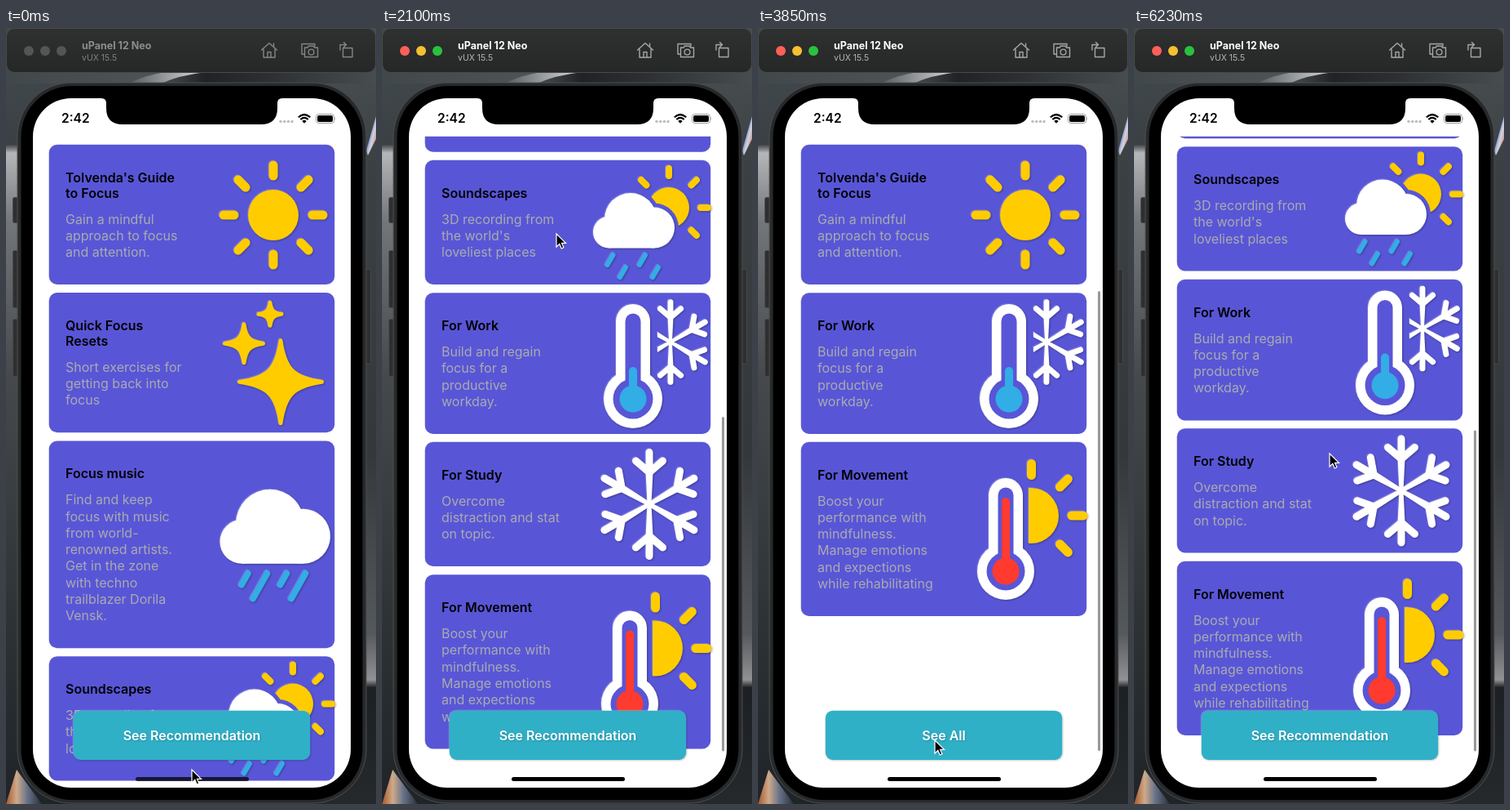
Animation, 454 px wide and 950 px high, one loop 6.3 s. Source, as an HTML page:

```html
<!DOCTYPE html>
<html lang="en">
<head>
<meta charset="utf-8">
<title>Focus list</title>
<style>
html, body { margin: 0; width: 100%; height: 100%; overflow: hidden; background: #34393c; }
svg { display: block; width: 454px; height: 950px; font-family: Inter, "Liberation Sans", sans-serif; }
.title { font-weight: 600; font-size: 16px; fill: #000; }
.body { font-size: 16px; fill: #aaaab0; }
.icon { filter: drop-shadow(1px 1px 1px rgba(0, 0, 0, .3)) drop-shadow(-.5px -.5px .5px rgba(255, 255, 255, .2)); }
.icon, .line { stroke-linecap: round; stroke-linejoin: round; }
.label { font-weight: 600; font-size: 16px; fill: #fff; text-anchor: middle; filter: drop-shadow(1px 1px 1px rgba(0, 0, 0, .2)); }
#button { filter: drop-shadow(1px 1px 1px rgba(0, 0, 0, .2)) drop-shadow(-.5px -.5px .5px rgba(255, 255, 255, .25)); }
#bar { --name: #8c8c8c; --sub: #808080; --tool: #858585; --a: #555; --b: #555; --c: #555; }
#bar.active { --name: #fff; --sub: #b4b4b4; --tool: #a6a6a6; --a: #ff5f57; --b: #f5c131; --c: #2ac13f; }
</style>
</head>
<body>
<svg viewBox="0 0 454 950">
  <defs>
    <linearGradient id="left" x2="0" y2="1">
      <stop offset="0" stop-color="#454c50"/><stop offset=".15" stop-color="#3a4044"/>
      <stop offset=".161" stop-color="#b4b6b8"/><stop offset=".25" stop-color="#737678"/>
      <stop offset=".45" stop-color="#45494c"/><stop offset=".8" stop-color="#2b3033"/><stop offset="1" stop-color="#1e2428"/>
    </linearGradient>
    <linearGradient id="right" x2="0" y2="1">
      <stop offset="0" stop-color="#4d5255"/><stop offset=".18" stop-color="#3b4043"/>
      <stop offset=".55" stop-color="#34383b"/><stop offset=".78" stop-color="#56595c"/>
      <stop offset=".84" stop-color="#909294"/><stop offset=".85" stop-color="#1d2022"/><stop offset="1" stop-color="#25292c"/>
    </linearGradient>
    <linearGradient id="top">
      <stop offset="0" stop-color="#41484c"/><stop offset=".4" stop-color="#4d5357"/>
      <stop offset=".54" stop-color="#202325"/><stop offset=".7" stop-color="#2b2f31"/><stop offset="1" stop-color="#484d50"/>
    </linearGradient>
    <linearGradient id="streak">
      <stop offset="0" stop-color="#555b5f"/><stop offset="1" stop-color="#dcddde"/>
    </linearGradient>
    <linearGradient id="prism" x2="1" y2="1">
      <stop offset="0" stop-color="#6b4fa8"/><stop offset=".35" stop-color="#4a7fe0"/>
      <stop offset=".6" stop-color="#d5d2da"/><stop offset="1" stop-color="#b8653e"/>
    </linearGradient>
    <linearGradient id="glow">
      <stop offset="0" stop-color="#a8582c"/><stop offset=".3" stop-color="#cfa98a"/>
      <stop offset=".6" stop-color="#65718a"/><stop offset="1" stop-color="#2b3033"/>
    </linearGradient>
    <linearGradient id="chrome" x2="0" y2="1">
      <stop offset="0" stop-color="#2f3030"/><stop offset="1" stop-color="#262727"/>
    </linearGradient>
    <clipPath id="screen"><rect x="33" y="86" width="390" height="844" rx="47"/></clipPath>
    <clipPath id="view"><rect x="33" y="132.700" width="390" height="798"/></clipPath>
    <clipPath id="rightHalf"><rect x="338" y="0" width="80" height="160"/></clipPath>
    <clipPath id="halfDisc"><rect x="332" y="0" width="80" height="213"/></clipPath>
  </defs>

  <rect width="227" height="950" fill="url(#left)"/>
  <rect x="227" width="227" height="950" fill="url(#right)"/>
  <rect width="454" height="68" fill="url(#top)"/>
  <path d="M150 68Q170 58 195 54H245Q212 58 190 68Z" fill="url(#streak)"/>
  <path d="M442 150L454 108V136L444 156Z" fill="url(#prism)"/>
  <path d="M0 950L13 908L44 950Z" fill="url(#glow)"/>

  <g id="bar">
    <rect x=".5" y=".5" width="453" height="54" rx="10" fill="url(#chrome)" stroke="#484a4a"/>
    <circle cx="28" cy="28" r="6" fill="var(--a)"/>
    <circle cx="48" cy="28" r="6" fill="var(--b)"/>
    <circle cx="68" cy="28" r="6" fill="var(--c)"/>
    <text x="93" y="26" font-size="12.500" font-weight="700" fill="var(--name)">uPanel 12 Neo</text>
    <text x="93" y="40" font-size="10.500" fill="var(--sub)">vUX 15.5</text>
    <g class="line" fill="none" stroke="var(--tool)" stroke-width="1.400">
      <path d="M313.500 27L323 18.500L332.500 27M316 25.500V36H330V25.500M328.500 22.500V19M321 36V29.500H325V36"/>
      <path d="M366 32H363V19.500H379V22M366.500 24H370L371.500 22H377L378.500 24H382.500V35.500H366.500Z"/>
      <circle cx="374.500" cy="29.500" r="3.400"/>
      <path d="M413.500 24.500H425V35.500H413.500ZM410 27V20.500H417M414.500 17.500L417.500 20.500L414.500 23.500"/>
    </g>
  </g>

  <g fill="#2d2f31" stroke="#45484a">
    <rect x="8.500" y="207.500" width="8" height="31" rx="2"/>
    <rect x="8.500" y="272.500" width="8" height="70" rx="2"/>
    <rect x="8.500" y="356.500" width="8" height="70" rx="2"/>
    <rect x="439.500" y="295.500" width="8" height="116" rx="2"/>
  </g>
  <rect x="14" y="67" width="428" height="882" rx="66" fill="#27292b" stroke="#4c4e50"/>
  <rect x="18.500" y="71" width="419" height="874" rx="62" fill="#000"/>

  <g clip-path="url(#screen)">
    <rect x="33" y="86" width="390" height="844" fill="#fff"/>
    <g clip-path="url(#view)"><g id="list"></g></g>
    <rect id="thumb" x="417" width="3" rx="1.500" fill="#98989a"/>
    <rect id="button" x="82.700" y="835.700" width="290.500" height="60.300" rx="9" fill="#30b0c7"/>
    <text id="some" class="label" x="228" y="872">See Recommendation</text>
    <text id="all" class="label" x="228" y="872">See All</text>
    <rect id="home" x="159" y="917" width="139" height="5" rx="2.500"/>
    <path d="M117 86q6 0 6 6v6q0 20 20 20h170q20 0 20-20v-6q0-6 6-6z"/>
    <text x="68" y="116.300" font-size="15.500" font-weight="600">2:42</text>
    <g fill="#bdbdbf">
      <circle cx="337" cy="114.500" r="1.700"/><circle cx="341.700" cy="114.500" r="1.700"/>
      <circle cx="346.400" cy="114.500" r="1.700"/><circle cx="351" cy="114.500" r="1.700"/>
    </g>
    <g fill="none" stroke="#000" stroke-width="2.200">
      <path d="M358.800 109.300Q366 102.700 373.200 109.300M361.300 112Q366 107.700 370.700 112"/>
    </g>
    <path d="M366 116.800L363.300 114Q366 111.700 368.700 114Z"/>
    <rect x="380.500" y="105.500" width="22" height="11" rx="3.200" fill="none" stroke="#999"/>
    <rect x="382" y="107" width="19" height="8" rx="2"/>
    <path d="M403.700 109.200q1.800 1.800 0 3.600z" fill="#999"/>
  </g>

  <g id="pointer">
    <g id="ring" fill="none">
      <circle r="20.300" stroke="#fff" stroke-opacity=".6"/>
      <circle r="21.500" stroke="#000" stroke-width="1.500"/>
    </g>
    <path d="M0 0V16L3.800 12.400L6.200 18L8.900 16.800L6.500 11.400H11.500Z" stroke="#fff" stroke-width="1.200"/>
  </g>
</svg>

<script>
const INDIGO = '#5856d6', YELLOW = '#ffcc00', BLUE = '#32ade6', RED = '#ff3b30';
const LOOP = 6300, STEP = 70, MAX = 604;
const $ = id => document.getElementById(id);

const line = (x1, y1, x2, y2, w, c) =>
  `<path d="M${x1} ${y1}L${x2} ${y2}" stroke="${c}" stroke-width="${w}"/>`;
const disc = (x, y, r, c) => `<circle cx="${x}" cy="${y}" r="${r}" fill="${c}"/>`;
const icon = (...parts) => `<g class="icon">${parts.join('')}</g>`;

// Rays start at the top and go clockwise in steps of 45 degrees.
const rays = (x, y, from, to, w, picks) => picks.map(i =>
  `<g transform="translate(${x} ${y}) rotate(${i * 45})">${line(0, -from, 0, -to, w, YELLOW)}</g>`).join('');

function star(x, y, r) {
  const a = .1 * r, b = .31 * r;
  return `<path transform="translate(${x} ${y})" fill="${YELLOW}" stroke="${YELLOW}" stroke-width="5"
    d="M0 ${-r}C${a} ${-b} ${b} ${-a} ${r} 0C${b} ${a} ${a} ${b} 0 ${r}C${-a} ${b} ${-b} ${a} ${-r} 0C${-b} ${-a} ${-a} ${-b} 0 ${-r}Z"/>`;
}

// Each puff is [x, y, r]; the base joins the outer two.
function cloud(puffs, grow = 0, c = '#fff') {
  const [l, , r] = puffs, bottom = l[1] + l[2];
  return puffs.map(p => disc(p[0], p[1], p[2] + grow, c)).join('') +
    `<rect x="${l[0]}" y="${l[1] - 14}" width="${r[0] - l[0]}" height="${bottom - l[1] + 14 + grow}" fill="${c}"/>`;
}

function thermometer(x, top, bulb, r, stem, c) {
  return line(x, top, x, bulb, 42, '#fff') + disc(x, bulb, r, '#fff') +
    line(x, top, x, bulb, 19, INDIGO) + disc(x, bulb, r - 11.5, INDIGO) +
    line(x, stem, x, bulb, 10, c) + disc(x, bulb, 16.5, c);
}

// Arms taper from the branching point to the centre.
function flake(x, y, s) {
  let arms = '';
  for (let i = 0; i < 6; i++)
    arms += `<g transform="rotate(${i * 60})"><path d="M0 -63.5V-40M-16.500 -53L0 -39L16.500 -53"/>
      <path d="M-4.500 -40L-2.500 0H2.500L4.500 -40Z" fill="#fff" stroke="none"/></g>`;
  return `<g transform="translate(${x} ${y}) scale(${s})" fill="none" stroke="#fff" stroke-width="9">${arms}</g>`;
}

const bigCloud = [[289.5, 123, 27], [324, 101, 42], [364.5, 116.5, 33.5]];
const smallCloud = [[278.5, 88, 19.5], [305, 72, 32], [334, 82.5, 25]];

const cards = [
  { y: 143, h: 171, to: 143, title: ["Tolvenda's Guide", 'to Focus'],
    body: ['Gain a mindful', 'approach to focus', 'and attention.'],
    art: icon(disc(328, 86, 31, YELLOW), rays(328, 86, 48, 61, 11, [0, 1, 2, 3, 4, 5, 6, 7])) },
  { y: 324.3, h: 171, title: ['Quick Focus', 'Resets'],
    body: ['Short exercises for', 'getting back into', 'focus'],
    art: icon(star(337, 109, 50.5), star(292, 62, 23.5), star(324, 26, 14)) },
  { y: 505.8, h: 253.5, title: ['Focus music'],
    body: ['Find and keep', 'focus with music', 'from world-', 'renowned artists.', 'Get in the zone', 'with techno', 'trailblazer Dorila', 'Vensk.'],
    art: icon(cloud(bigCloud),
      ...[[297, 289, 176], [320.5, 303, 193], [344.5, 336.5, 176], [367.5, 350, 193]]
        .map(([a, b, y]) => line(a, 162, b, y, 7.5, BLUE))) },
  { y: 769.5, h: 152, title: ['Soundscapes'],
    body: ['3D recording from', "the world's", 'loveliest places'],
    art: icon(disc(352, 58, 25, YELLOW), rays(352, 58, 39, 48, 8, [0, 1, 2, 3, 7])) +
      cloud(smallCloud, 5, INDIGO) +
      icon(cloud(smallCloud),
        ...[[280, 122], [295.5, 137], [319.5, 122], [335.5, 137]]
          .map(([x, y]) => line(x + 3.5, y - 6, x - 3.5, y + 6, 6, BLUE))) },
  { y: 932, h: 172.5, to: 324.5, title: ['For Work'],
    body: ['Build and regain', 'focus for a', 'productive', 'workday.'],
    art: icon(`<g clip-path="url(#rightHalf)">${flake(354, 60, .77)}</g>`,
      thermometer(308, 34.5, 129.5, 36, 95.5, BLUE)) },
  { y: 1114.5, h: 152, title: ['For Study'],
    body: ['Overcome', 'distraction and stat', 'on topic.'],
    art: icon(flake(328, 76, 1)) },
  { y: 1277, h: 213, to: 507, title: ['For Movement'],
    body: ['Boost your', 'performance with', 'mindfulness.', 'Manage emotions', 'and expections', 'while rehabilitating'],
    art: icon(`<g clip-path="url(#halfDisc)">${disc(335, 90, 34, YELLOW)}</g>`,
      rays(335.5, 90, 49.5, 63.5, 11, [0, 1, 2, 3]),
      thermometer(304, 65, 158, 35, 73, RED)) }
];

const rows = (lines, cls, y, gap) =>
  lines.map((s, i) => `<text class="${cls}" x="73" y="${y + i * gap}">${s}</text>`).join('');

$('list').innerHTML = cards.map(c => {
  const last = 45.7 + (c.title.length - 1) * 19;
  return `<g><rect x="52.700" y="-.3" width="350.500" height="${c.h + .3}" rx="10" fill="${INDIGO}"/>` +
    rows(c.title, 'title', 45.7, 19) + rows(c.body, 'body', last + 31.8, 20.3) + c.art + '</g>';
}).join('');
cards.forEach((c, i) => c.node = $('list').children[i]);

const lin = p => p;
const smooth = p => p * p * (3 - 2 * p);
const easeIn = p => p ** 1.6;
const easeOut = p => 1 - (1 - p) ** 2;
const mix = (a, b, p) => a + (b - a) * p;

// Keys are [time, value, easing into this key].
function track(keys, t) {
  const i = keys.findIndex(k => k[0] > t);
  if (i < 0) return keys[keys.length - 1][1];
  if (i === 0) return keys[0][1];
  const [t0, a] = keys[i - 1], [t1, b, ease = lin] = keys[i];
  return mix(a, b, ease((t - t0) / (t1 - t0)));
}

const scroll = [[1050, 0], [1470, 447.5, smooth], [1540, 496], [1820, 632, easeOut], [2100, 607.5, smooth],
  [2310, MAX, easeOut], [2590, 166, smooth], [2800, -45, easeOut], [3080, -7.5, smooth], [3360, 0, easeOut],
  [5600, 0], [5740, 207, easeIn], [5880, 540], [6020, 645, easeOut], [6230, 624, smooth]];
const pointX = [[0, 228], [280, 323, smooth], [630, 323], [1050, 222, smooth], [1470, 204], [1540, 214],
  [2310, 214], [3010, 217], [5250, 217], [5530, 225, smooth], [5740, 240]];
const pointY = [[0, 908], [280, 168, smooth], [630, 168], [1050, 748.5, smooth], [1470, 301, smooth], [1540, 252],
  [2310, 252], [2590, 690, smooth], [3010, 872, easeOut], [5250, 872], [5530, 728, smooth], [5600, 728], [5740, 521, easeIn]];
const filter = [[3500, 0], [3850, 1, smooth], [4550, 1], [4900, 0, smooth]];
const thumbAlpha = [[1050, 0], [1120, 1], [4480, 1], [4760, 0], [5600, 0], [5670, 1]];
const presses = [[1050, 1540], [2310, 2590], [3360, 3500], [4480, 4620], [5600, 5740]];

function draw(t) {
  const off = track(scroll, t), m = track(filter, t);

  for (const c of cards) {
    const kept = c.to !== undefined;
    c.node.setAttribute('transform', `translate(0 ${(kept ? mix(c.y, c.to, m) : c.y) - off})`);
    c.node.setAttribute('opacity', kept ? 1 : 1 - m);
  }

  const over = Math.max(0, off - MAX, -off), size = 413 - over;
  const top = off > MAX ? 885.5 - size : 157 + Math.max(0, off) * .5224;
  $('thumb').setAttribute('y', mix(top, 322, m));
  $('thumb').setAttribute('height', mix(size, 563, m));
  $('thumb').setAttribute('opacity', track(thumbAlpha, t));

  $('some').setAttribute('opacity', 1 - m);
  $('all').setAttribute('opacity', m);
  $('home').setAttribute('opacity', off < 571 ? mix(.75, 1, m) : 1);
  $('bar').setAttribute('class', t >= 700 ? 'active' : '');

  $('pointer').setAttribute('transform', `translate(${track(pointX, t)} ${track(pointY, t)})`);
  $('ring').setAttribute('opacity', presses.some(([a, b]) => t >= a && t < b) ? 1 : 0);
}

function tick() {
  draw(Math.floor(performance.now() % LOOP / STEP) * STEP);
  requestAnimationFrame(tick);
}
tick();
</script>
</body>
</html>
```
